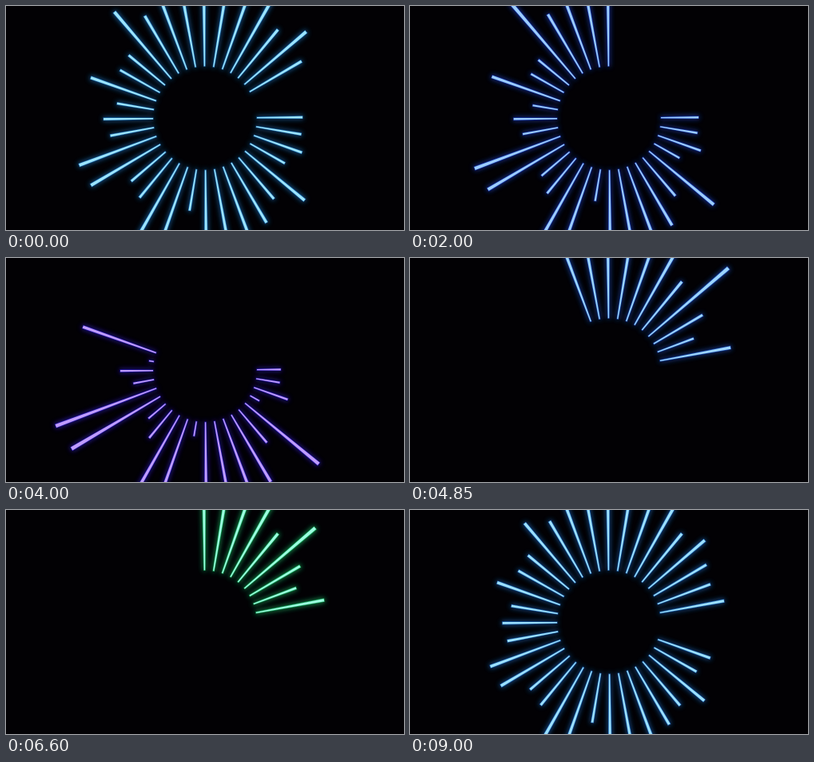
An HTML page that plays this animation: 498 by 280 pixels, repeating every 9.05 s.

```html
<!DOCTYPE html>
<html lang="en">
<head>
<meta charset="utf-8">
<title>Radial bars</title>
<style>
  html, body { margin: 0; width: 100%; height: 100%; overflow: hidden; background: #020104; }
  svg { display: block; width: 100%; height: 100%; }
  #glow { fill: hsl(var(--halo) 75% 42%); stroke: hsl(var(--halo) 75% 42%); stroke-width: 2.2; opacity: .8; }
  #edge { fill: none; stroke: hsl(var(--halo) 80% 50%); stroke-width: 1.2; opacity: .6; }
  #core { fill: hsl(var(--hue) 95% 80%); }
</style>
</head>
<body>
<svg viewBox="0 0 498 280">
  <defs>
    <filter id="blur" filterUnits="userSpaceOnUse" x="-20" y="-20" width="538" height="320">
      <feGaussianBlur stdDeviation="3"/>
    </filter>
  </defs>
  <path id="glow" filter="url(#blur)"/>
  <path id="edge"/>
  <path id="core"/>
</svg>
<script>
const LOOP = 9050, STEP = 50;
const CX = 249, CY = 140.2, INNER = 65, MEAN = 143.3, TILT = -0.5;
const SWEEP = 911, LEAD = 62.5;

// How far each bar stands out from the mean circle, clockwise from the right
const levels = [
  -13, -13, -9, -17.5, 11, -6.5, 5, 20, 20, 20, -16, 20,
  20, -9, -13.5, 13.5, 15, -14, -10, -19.4, 5, -13, -12, 19,
  3, 20, 20, 20, 20, 20, 20, 0, 14, -2, -8, 3
];
const COUNT = levels.length;

const hues = [[0, 195], [1250, 190], [2800, 230], [4000, 262], [5750, 143], [7450, 182], [9050, 198]];

const svg = document.querySelector("svg");
const layers = svg.querySelectorAll("svg > path");

function hueAt(t) {
  const i = hues.findIndex(key => key[0] > t);
  const [t0, h0] = hues[i - 1], [t1, h1] = hues[i];
  return h0 + (h1 - h0) * (t - t0) / (t1 - t0);
}

// The contrast between long and short bars swells once per loop
function contrast(t) {
  const x = t / LOOP * Math.PI;
  return 1.64 - 0.64 * t / LOOP + 2.5 * Math.sin(x) ** 2 - 0.12 * Math.sin(2 * x);
}

// Counterclockwise sweeps hide and reveal the bars in turn
function visibility(t) {
  const turn = (t + LEAD) / SWEEP, p = turn % 1;
  const hiding = Math.floor(turn) % 2 === 0;
  const lag = (hiding ? 0.03 : 0.09) * Math.sin(Math.PI * p) ** 2;
  const passed = Math.floor(COUNT * (p - lag));
  return k => (COUNT - 1 - k < passed) !== hiding;
}

// A bar that widens away from the centre
function barPath(k, outer) {
  const a = (360 / COUNT * k + TILT) * Math.PI / 180, c = Math.cos(a), s = Math.sin(a);
  const at = (r, w) => `${(CX + r * c - w * s).toFixed(2)} ${(CY + r * s + w * c).toFixed(2)}`;
  const w0 = 0.7, w1 = w0 + (outer - INNER) * 0.0115;
  return `M${at(INNER, -w0)}L${at(outer, -w1)}L${at(outer, w1)}L${at(INNER, w0)}Z`;
}

function draw(t) {
  const shown = visibility(t), gain = contrast(t), hue = hueAt(t);
  const d = levels.map((v, k) => shown(k) ? barPath(k, MEAN + v * gain) : "").join("");
  layers.forEach(path => path.setAttribute("d", d));
  // The glow leans towards pure green or blue
  svg.style.setProperty("--hue", hue);
  svg.style.setProperty("--halo", hue - 18 * Math.sin((hue - 120) * Math.PI / 60));
}

const start = performance.now();
function tick() {
  const t = (performance.now() - start) % LOOP;
  draw(Math.floor(t / STEP) * STEP);
  requestAnimationFrame(tick);
}
tick();
</script>
</body>
</html>
```
